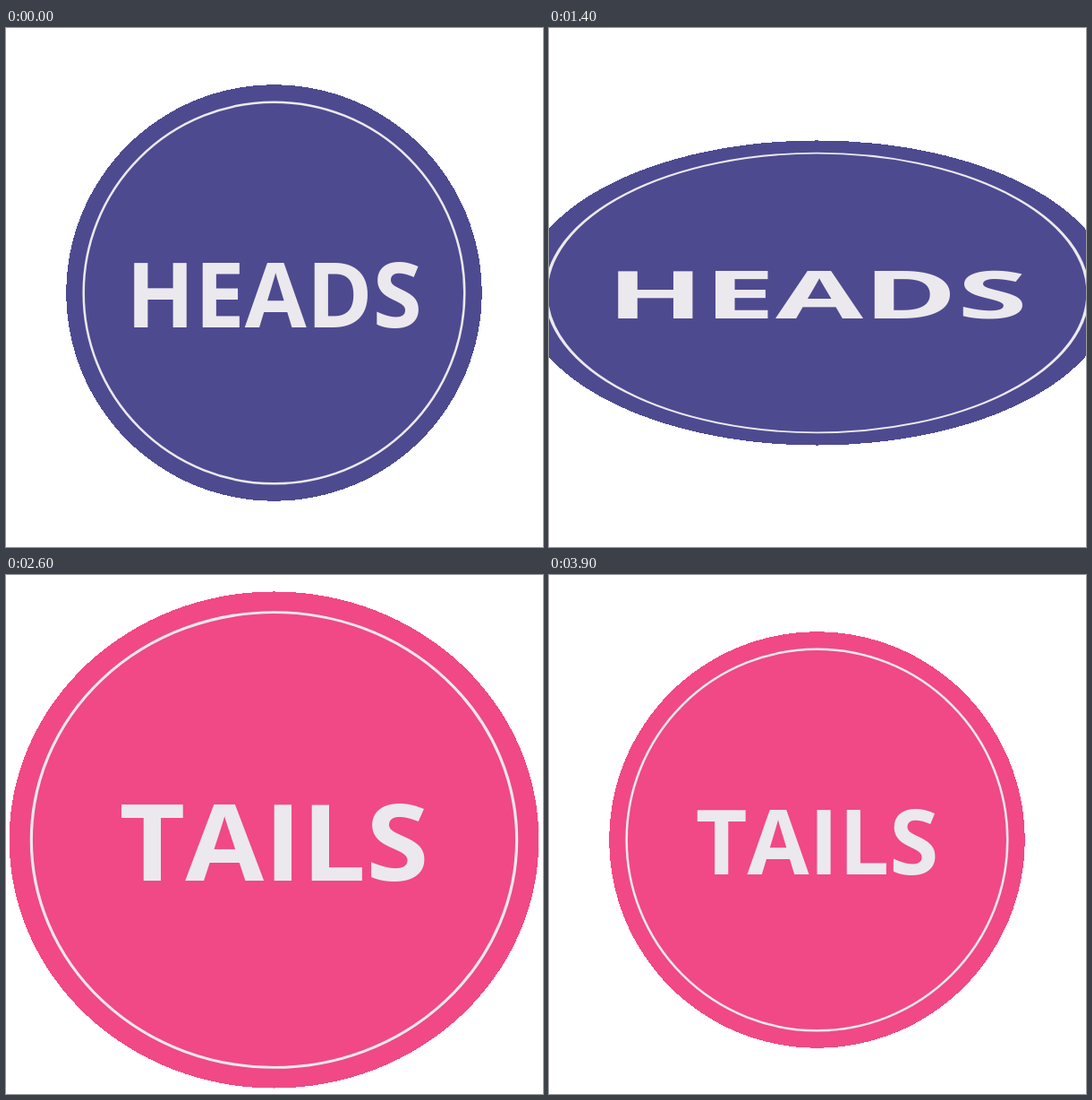
An HTML page for the animation above (4000 ms loop, 600x579 px).

```html
<!DOCTYPE html>
<html lang="en">
<head>
<meta charset="utf-8">
<title>Coin flip</title>
<style>
  html, body { margin: 0; width: 100%; height: 100%; overflow: hidden; background: #fff; }
  svg { display: block; width: 600px; height: 579px; }
  .disc { shape-rendering: crispEdges; }
  .ring { fill: none; stroke: #ebe9ed; stroke-width: 2.5; }
  text {
    font: 700 100px "Open Sans", sans-serif;
    font-kerning: none;
    fill: #ebe9ed;
    text-anchor: middle;
  }
</style>
</head>
<body>
<svg viewBox="0 0 600 579">
  <g id="coin">
    <circle id="disc" class="disc" r="232.2"/>
    <circle class="ring" r="212.8"/>
    <text id="label" y="38.5"></text>
  </g>
</svg>
<script>
const LOOP = 4000, STEP = 100;
const CX = 299.5, CY = 295.5;
const TURN = 2700, LIFT = 0.5;
const SIDES = {
  heads: { text: 'HEADS', fill: '#4e4a90' },
  tails: { text: 'TAILS', fill: '#f04985' }
};

// Spin angle in degrees at a few times in ms
const SPIN = [
  [0, 0], [300, 290], [600, 555], [800, 698], [1100, 931], [1400, 1139],
  [2000, 1496.5], [2300, 1728], [3000, 2268], [3560, TURN], [LOOP, TURN]
];

const coin = document.getElementById('coin');
const disc = document.getElementById('disc');
const label = document.getElementById('label');

function angleAt(t) {
  const i = SPIN.findIndex(p => p[0] > t);
  const [t0, a0] = SPIN[i - 1], [t1, a1] = SPIN[i];
  return a0 + (a1 - a0) * (t - t0) / (t1 - t0);
}

function draw(t) {
  const angle = angleAt(t);
  const height = Math.min(angle, TURN - angle) / (TURN / 2);
  const scale = 1 + LIFT * height;
  const tilt = Math.cos(angle * Math.PI / 180);
  const side = tilt > 0 ? SIDES.heads : SIDES.tails;
  disc.setAttribute('fill', side.fill);
  label.textContent = side.text;
  coin.setAttribute('transform',
    `translate(${CX} ${CY}) scale(${scale} ${scale * Math.abs(tilt)})`);
}

let start = null;
function tick(now) {
  if (start === null) start = now;
  const t = Math.max(0, now - start) % LOOP;
  draw(Math.floor(t / STEP + 1e-6) * STEP % LOOP);
  requestAnimationFrame(tick);
}
draw(0);
requestAnimationFrame(tick);
</script>
</body>
</html>
```
